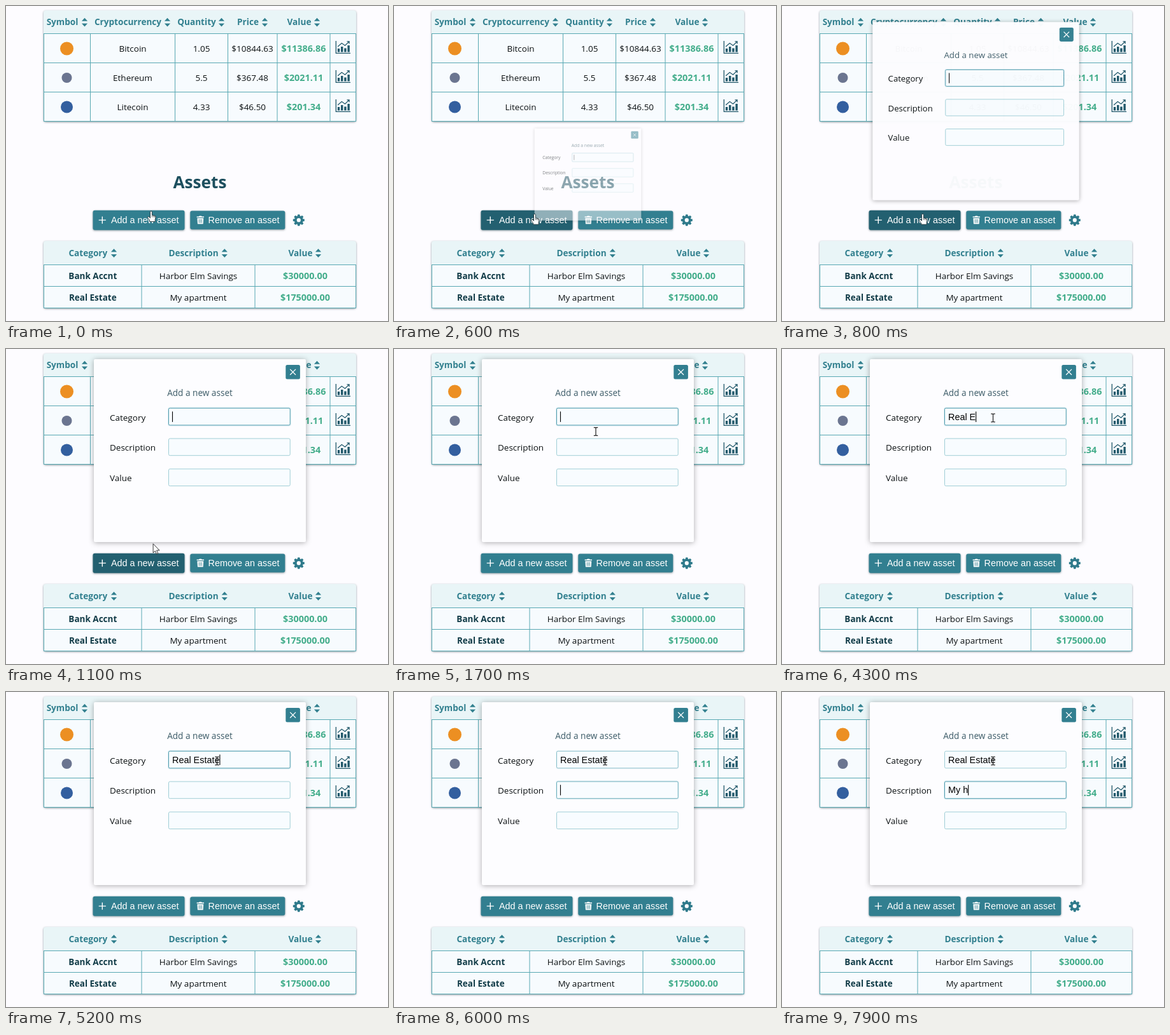
Animation, 600 px wide and 496 px high, one loop 8000 ms. Source, as an HTML page:

```html
<!DOCTYPE html>
<html lang="en">
<head>
<meta charset="utf-8">
<title>Assets</title>
<style>
  html, body { margin: 0; width: 100%; height: 100%; overflow: hidden; background: #fdfcff; }
  svg { display: block; width: 600px; height: 496px; }
  text { font: 13.5px "Open Sans", "Noto Sans", sans-serif; fill: #0c1113; white-space: pre; }
  .mid { text-anchor: middle; }
  .head { font-size: 13.6px; font-weight: 700; fill: #32808f; }
  .value { font-size: 14.4px; font-weight: 700; fill: #43ad8b; }
  .strong { font-weight: 700; fill: #123c48; }
  .title { font-size: 26.2px; font-weight: 700; fill: #1d4f5e; }
  .caption { font-size: 13.6px; fill: #3c5b67; }
  .button { font: 14.4px "Liberation Sans", Arial, sans-serif; fill: #fff; }
  .typed { font: 14.4px "Liberation Sans", Arial, sans-serif; fill: #000; }
  .shadow { filter: drop-shadow(0 1px 1.5px rgba(0, 30, 40, .45)); }
  .lift { filter: drop-shadow(0 1px 4px rgba(0, 0, 0, .32)); }
</style>
</head>
<body>
<svg id="stage" viewBox="0 0 600 496">
  <defs>
    <path id="sort" d="M-4.6-1.8 0-6.8 4.6-1.8ZM-4.6 1.8 0 6.8 4.6 1.8Z" fill="#32808f"/>
    <g id="chart" fill="none" stroke="#21586a">
      <path d="M.8 0V19.3H23.5" stroke-width="1.3"/>
      <path d="M5 17.5V12M10.2 17.5V9M15.4 17.5V11.5M20.6 17.5V7" stroke-width="3.4"/>
      <path d="M3.5 9 9.8 3.5 15 7.2 21.5 1M18 .9H21.6V4.4" stroke-width="1.2"/>
    </g>
  </defs>
  <g id="page"></g>
  <g id="modal"></g>
  <g id="hand">
    <path d="M-1.5 1.2C-1.5-.5 1.4-.5 1.4 1.2V6.2L5.8 7.3Q7.3 7.8 7.1 9.4L6.2 13.3V16.5H-2.3V14.6L-5.2 10.6C-6.2 9-4.4 7.9-3.2 9.2L-1.5 10.8Z"
      fill="#fff" stroke="#24363c" stroke-width=".9"/>
    <path d="M1.4 6.5V9.5M3.5 7V9.7M5.5 7.4V9.9" stroke="#24363c" stroke-width=".7"/>
  </g>
  <path id="arrow" d="M0 0V14.2L3.2 11.2 5.3 16 7.6 15 5.5 10.3H10Z" fill="#fff" stroke="#222" stroke-width=".9"/>
  <path id="beam" d="M-3.2-6.4H-.9L0-5.6.9-6.4H3.2M0-5.6V5.6M-3.2 6.4H-.9L0 5.6.9 6.4H3.2" fill="none" stroke="#222" stroke-width="1.2"/>
</svg>
<script>
const LOOP = 8000;
const OPEN = 483;
const $ = id => document.getElementById(id);
const clamp = x => Math.max(0, Math.min(1, x));
const ramp = (t, a, b) => clamp((t - a) / (b - a));
const smooth = x => x * x * (3 - 2 * x);
const lerp = (a, b, k) => a + (b - a) * k;
const mix = (a, b, k) => `rgb(${a.map((v, i) => Math.round(lerp(v, b[i], k)))})`;

// CSS "ease": cubic-bezier(.25, .1, .25, 1)
function ease(x) {
  if (x <= 0 || x >= 1) return clamp(x);
  const bez = (a, b, u) => 3 * a * u * (1 - u) ** 2 + 3 * b * u * u * (1 - u) + u ** 3;
  let lo = 0, hi = 1;
  for (let i = 0; i < 24; i++) {
    const u = (lo + hi) / 2;
    if (bez(.25, .25, u) < x) lo = u; else hi = u;
  }
  return bez(.1, 1, lo);
}

const text = (x, y, s, cls = "mid") => `<text x="${x}" y="${y}" class="${cls}">${s}</text>`;
const use = (id, x, y) => `<use href="#${id}" x="${x}" y="${y}"/>`;
const rect = (x, y, w, h, rx, extra) => `<rect x="${x}" y="${y}" width="${w}" height="${h}" rx="${rx}" ${extra}/>`;

// heads: [label, label x, icon x]
function table(top, ys, xs, heads) {
  const first = ys[0], last = ys[ys.length - 1];
  const rules = ys.map(y => `M59 ${y}H550`).join("") + xs.map(x => `M${x} ${first}V${last}`).join("");
  const mid = (top + first) / 2 + .4;
  return `<g class="shadow">${rect(59, top, 491, last - top + .5, 4, 'fill="#e9f5f7"')}</g>`
    + rect(59, first, 491, last - first, 0, 'fill="#f7fbfe"')
    + `<path d="${rules}" fill="none" stroke="#58a8b2"/>`
    + heads.map(([s, x, icon]) => text(x, mid + 4.7, s, "mid head") + use("sort", icon, mid)).join("");
}

function buildPage() {
  const coins = [
    ["Bitcoin", "1.05", "$10844.63", "$11386.86", "#ec8f22", 10.5],
    ["Ethereum", "5.5", "$367.48", "$2021.11", "#6b7590", 8],
    ["Litecoin", "4.33", "$46.50", "$201.34", "#335f9f", 9.5]
  ];
  const assets = [
    ["Bank Accnt", "Harbor Elm Savings", "$30000.00"],
    ["Real Estate", "My apartment", "$175000.00"]
  ];
  let s = table(7, [43.5, 89.5, 135.5, 181.5], [59.5, 132.5, 265.5, 348.5, 426, 509, 549.5], [
    ["Symbol", 88.5, 123.5], ["Cryptocurrency", 191.5, 253.5], ["Quantity", 299.5, 338.5],
    ["Price", 380, 406.5], ["Value", 460.5, 488.5]
  ]);
  coins.forEach(([name, qty, price, value, color, r], i) => {
    const y = 72.3 + 46 * i;
    s += `<circle cx="95.5" cy="${y - 5.3}" r="${r}" fill="${color}"/>`
      + text(199, y, name) + text(307, y, qty) + text(387, y, price)
      + text(467.5, y, value, "mid value") + use("chart", 517.5, y - 17.3);
  });
  s += text(304.5, 286.5, "Assets", "mid title");
  s += table(370, [407.5, 441.5, 475.5], [59.5, 213, 391, 549.5], [
    ["Category", 128.8, 169.5], ["Description", 294.5, 343.3], ["Value", 462.5, 490.5]
  ]);
  assets.forEach(([cat, desc, value], i) => {
    const y = 430 + 34.4 * i;
    s += text(136.3, y, cat, "mid strong") + text(302, y, desc) + text(470, y, value, "mid value");
  });
  s += `<g class="shadow">${rect(136.5, 321.7, 144, 31, 3, 'id="add"')}${rect(289.3, 322.5, 149, 29.3, 3, 'fill="#327f90"')}</g>`
    + `<path d="M151.3 331.5V342.7M145.7 337.1H156.9" stroke="#fff" stroke-width="1.4"/>`
    + text(165, 342, "Add a new asset", "button") + text(317.5, 342, "Remove an asset", "button")
    + `<path d="M299.6 331.4H303L303.7 330.4H306.9L307.6 331.4H311V333H299.6ZM300.4 334H310.2L309.6 343.3H301Z" fill="#fff"/>`
    + `<path d="M303.2 335.6V341.7M305.3 335.6V341.7M307.4 335.6V341.7" stroke="#327f90" stroke-width=".8"/>`;
  let teeth = "";
  for (let i = 0; i < 8; i++) teeth += `<path d="M-2.3-5.4-1.6-9H1.6L2.3-5.4Z" fill="#2f7a8b" transform="rotate(${i * 45})"/>`;
  s += `<g transform="translate(459.8 337.2)">${teeth}<circle r="5" fill="none" stroke="#2f7a8b" stroke-width="3.8"/></g>`;
  $("page").innerHTML = s;
}

const rows = [["Category", 93.2], ["Description", 141], ["Value", 188.9]];

function buildModal() {
  let s = `<g class="lift">${rect(138, 16, 333, 288, 2, 'fill="#fdfdff"')}</g>`
    + rect(439.3, 25, 22.6, 22.6, 2.5, 'fill="#327f90"')
    + `<path d="M446.2 31.9 455 40.7M455 31.9 446.2 40.7" stroke="#fff" stroke-width="1.3"/>`
    + text(304.5, 74, "Add a new asset", "mid caption");
  rows.forEach(([label, y], i) => {
    s += text(163, y + 19.3, label, "")
      + rect(255.5, y, 190.7, 26.7, 2, `id="glow${i}" fill="none" stroke="#6db4c8" stroke-width="3" opacity="0"`)
      + rect(255.5, y, 190.7, 26.7, 2, `id="box${i}" fill="#f8fcff" stroke="#a0ced6"`)
      + `<text id="typed${i}" x="261" y="${y + 18.3}" class="typed"></text>`;
  });
  $("modal").innerHTML = s + '<path id="caret" d="M.5 0V16.5" stroke="#000" stroke-width="1.1"/>';
}

const pen = document.createElement("canvas").getContext("2d");
pen.font = '14.4px "Liberation Sans", Arial, sans-serif';

// focus, blur, start of caret blinking, text and key times of each field
const fields = [
  { focus: OPEN, blur: 5800, blink: 700, word: "Real Estate", keys: [2900, 3200, 3400, 3600, 3800, 4300, 4500, 4600, 4700, 4800, 4900] },
  { focus: 5800, blur: 9000, blink: 5800, word: "My h", keys: [6800, 7100, 7400, 7900] }
];

function drawFields(t) {
  fields.forEach(({ focus, blur, blink, word, keys }, i) => {
    const count = keys.filter(k => k <= t).length;
    const shown = word.slice(0, count);
    const active = ramp(t, focus, focus + 300) - ramp(t, blur, blur + 300);
    $("typed" + i).textContent = shown;
    $("box" + i).setAttribute("stroke", mix([160, 206, 214], [84, 158, 174], active));
    $("glow" + i).setAttribute("opacity", .28 * active);
    if (t < focus || t >= blur) return;
    const last = count ? keys[count - 1] : blink;
    const on = t < last || Math.floor((t - last) / 500) % 2 === 0;
    $("caret").setAttribute("opacity", on ? 1 : 0);
    $("caret").setAttribute("transform", `translate(${261 + pen.measureText(shown).width} ${rows[i][1] + 5.2})`);
  });
}

function drawPointer(t) {
  const a = smooth(ramp(t, 100, 400)), b = smooth(ramp(t, 950, 1700)), c = smooth(ramp(t, 1700, 2100));
  const x = lerp(lerp(lerp(228, 221, a), 317, b), 331.5, c);
  const y = lerp(lerp(lerp(323, 327.5, a), 130, b), 108.5, c);
  const kind = y > 321 ? "hand" : y < 216 ? "beam" : "arrow";
  for (const id of ["hand", "arrow", "beam"]) {
    $(id).setAttribute("display", id === kind ? "inline" : "none");
    $(id).setAttribute("transform", `translate(${x} ${y})`);
  }
}

function draw(t) {
  const hover = ramp(t, 100, 350) - ramp(t, 1120, 1350);
  $("add").setAttribute("fill", mix([50, 127, 144], [35, 96, 112], hover));
  const p = ease(ramp(t, OPEN, OPEN + 400));
  $("modal").setAttribute("display", p > 0 ? "inline" : "none");
  $("modal").setAttribute("opacity", p);
  $("modal").setAttribute("transform", `translate(304.5 ${160 + 212 * (1 - p)}) scale(${p}) translate(-304.5 -160)`);
  drawFields(t);
  drawPointer(t);
}

buildPage();
buildModal();

const start = performance.now();
function tick() {
  draw((performance.now() - start) % LOOP);
  requestAnimationFrame(tick);
}
tick();
</script>
</body>
</html>
```
